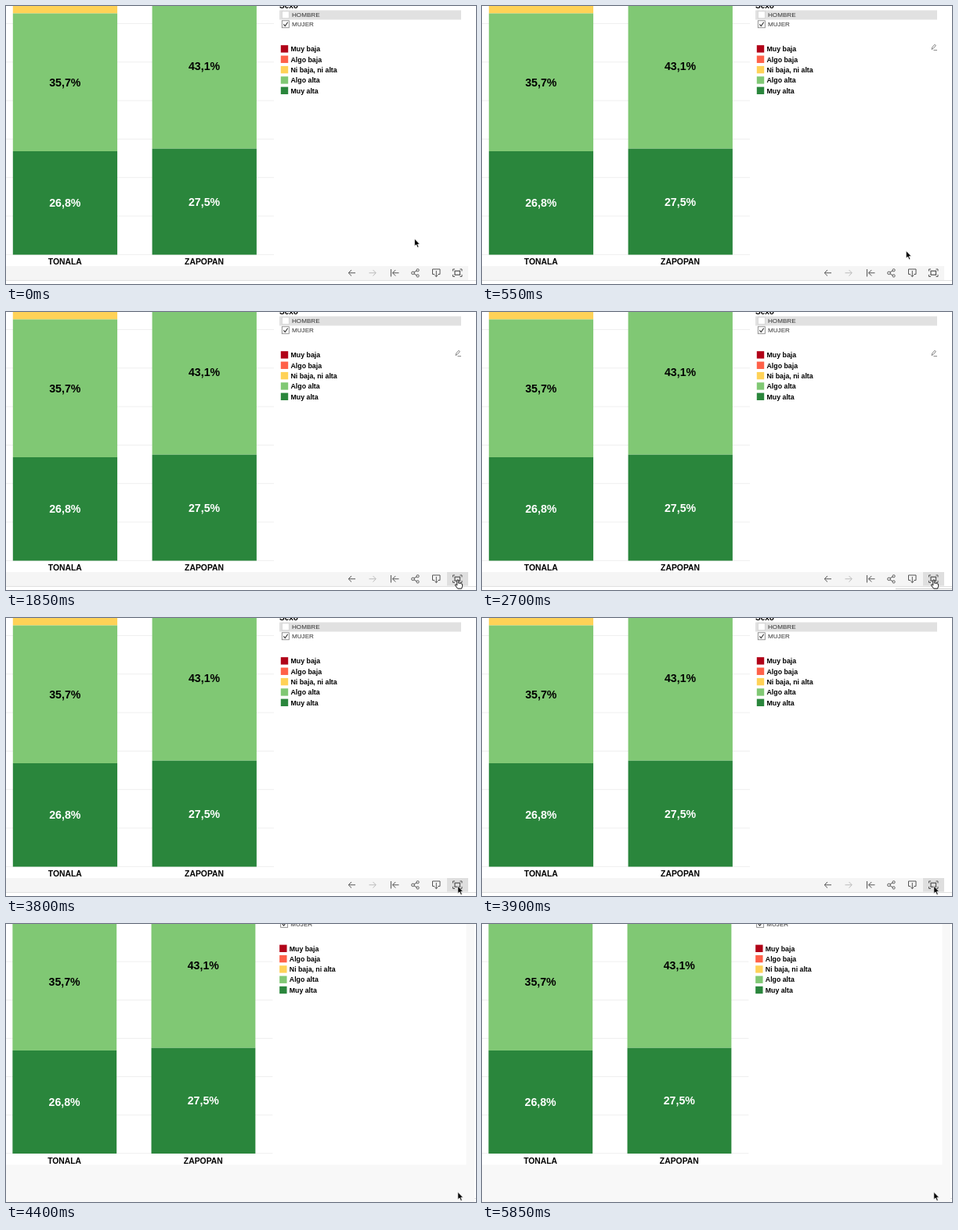
Recreate the animation shown at these times as an HTML page. Size 600 px wide and 356 px high, loop 5900 ms.

```html
<!DOCTYPE html>
<html lang="es">
<head>
<meta charset="utf-8">
<style>
html, body { margin: 0; width: 100%; height: 100%; overflow: hidden; background: #fff; }
svg { display: block; width: 600px; height: 356px; font-family: "Liberation Sans", Arial, sans-serif; }
.b { font-weight: bold; }
.m { text-anchor: middle; }
.icon { fill: none; stroke: #555; stroke-width: 1; }
</style>
</head>
<body>
<svg viewBox="0 0 600 356">
  <rect id="back" width="600" height="356"/>
  <g id="edge">
    <rect width="10" height="356" fill="#fff"/>
    <path d="M0 351.5h10" stroke="#e4e4e4"/>
  </g>
  <g id="page">
    <rect x="-10" y="-10" width="600" height="343" fill="#fff"/>
    <g id="chart"></g>
    <rect x="349" y="5.5" width="232" height="12" fill="#e1e1e1"/>
    <rect x="352.3" y="6.8" width="9" height="9" fill="#fff" stroke="#cfcfcf" stroke-width=".8"/>
    <rect x="352.3" y="18.8" width="9" height="9" fill="#fff" stroke="#777" stroke-width=".8"/>
    <path d="M354.3 23.4l2 2.2 3.4-4.8" fill="none" stroke="#333" stroke-width="1.1"/>
    <g id="pencil" fill="none" stroke="#666" stroke-width=".8">
      <path d="M574 55.5l.8-2.6 3-3.6 1.6 1.3-3 3.6zM576.5 56.6h4.5"/>
    </g>
  </g>
  <g id="toolbar">
    <rect y="333" width="590" height="18" fill="#f5f5f5"/>
    <path d="M0 351.5h600" stroke="#e0e0e0"/>
    <rect id="hover" x="563" y="333" width="27" height="17.5" fill="#dfdfdf"/>
    <g class="icon">
      <path d="M437.5 341.8h8.5M441 338l-3.8 3.8 3.8 3.8"/>
      <path d="M463.5 341.8h8.5M468.500 338l3.800 3.800-3.800 3.800" stroke="#bbb"/>
      <path d="M491.500 337v9.500M493.500 341.800h8M497.300 338l-3.800 3.800 3.800 3.800"/>
      <path d="M521 341l3.200-2M521 342.800l3.200 2"/>
      <circle cx="519.500" cy="341.900" r="1.800"/>
      <circle cx="525.600" cy="338.300" r="1.600"/>
      <circle cx="525.600" cy="345.500" r="1.600"/>
      <path d="M547 343.500h-2.500v-6.500h9.500v6.500h-2.500M549.300 339v7.500M547.200 344.600l2.100 2.100 2.100-2.100"/>
      <path d="M570.500 339.500v-2.500h2.500M579.500 337h2.500v2.500M582 344v2.500h-2.500M573 346.500h-2.500v-2.500"/>
      <rect x="573" y="339.300" width="6.500" height="5" stroke-width="1.200"/>
    </g>
  </g>
  <path id="tip" d="M528 354.500h72" stroke="#cfcfcf"/>
  <g id="cursor" stroke-linejoin="round">
    <path id="arrow" d="M0 0v9.600l2.200-2 1.700 3.700 1.600-.7-1.600-3.500h2.900z" fill="#000" stroke="#fff" stroke-width=".7"/>
    <path id="hand" d="M-1 1q0-1.200 1-1.200t1 1.200v3.200q1-.7 1.700.2 1-.6 1.700.4 1.400-.3 1.400 1.200v2.200l-1 2.800h-5l-3-4q-.5-1.300.6-1.300l1.600 1.200z"
      fill="#fff" stroke="#000" stroke-width=".9"/>
  </g>
</svg>
<script>
const $ = id => document.getElementById(id);
const RED = '#b10318', CORAL = '#ff6149', YELLOW = '#ffd257', LIGHT = '#80c874', DARK = '#2a863c';

const rect = (x, y, w, h, fill) => `<rect x="${x}" y="${y}" width="${w}" height="${h}" fill="${fill}"/>`;
const text = (s, x, mid, size, cls = '', fill = '#000') =>
  `<text x="${x}" y="${mid + size * .358}" font-size="${size}" class="${cls}" fill="${fill}">${s}</text>`;

function bar(x, name, split, top, high, low, highY, lowY) {
  const mid = x + 66.5;
  return rect(x, -30, 133.3, 30 + top, YELLOW) + rect(x, top, 133.3, split - top, LIGHT) +
    rect(x, split, 133.3, 318.5 - split, DARK) +
    text(high, mid, highY, 14.2, 'b m') + text(low, mid, lowY, 14.2, 'b m', '#fff') +
    text(name, mid, 327.7, 10.4, 'b m');
}

let chart = '';
for (let i = 0; i < 7; i++) chart += rect(-10, 22 + i * 49.3, 352, 1, '#efefef');
chart += bar(8.8, 'TONALA', 186, 9.5, '35,7%', '26,8%', 98, 252.3);
chart += bar(186.6, 'ZAPOPAN', 182.7, -30, '43,1%', '27,5%', 76.5, 250.5);
chart += text('Sexo', 349, -1, 10, 'b');
['Muy baja', 'Algo baja', 'Ni baja, ni alta', 'Algo alta', 'Muy alta'].forEach((s, i) => {
  const y = 55 + i * 13.35;
  chart += rect(350.8, y - 4.8, 9.4, 9.4, [RED, CORAL, YELLOW, LIGHT, DARK][i]) + text(s, 363.5, y, 8.8, 'b');
});
$('chart').innerHTML = chart;
$('page').insertAdjacentHTML('beforeend',
  text('HOMBRE', 365, 11.6, 8.1, '', '#333') + text('MUJER', 365, 23.4, 8.1, '', '#333'));

// Cursor path: time, x, y
const path = [[0, 521.5, 298], [300, 521.5, 298], [900, 574, 339], [1050, 574, 339], [1350, 576.8, 343.2], [5900, 576.8, 343.2]];
function cursorAt(t) {
  const i = path.findIndex(p => p[0] > t), [t0, x0, y0] = path[i - 1], [t1, x1, y1] = path[i];
  const u = (t - t0) / (t1 - t0), e = u * u * (3 - 2 * u);
  return [x0 + (x1 - x0) * e, y0 + (y1 - y0) * e];
}

const show = (id, on) => $(id).style.display = on ? '' : 'none';

function draw(now) {
  const t = now % 5900, full = t >= 3950, [x, y] = cursorAt(t);
  const [scale, dx, dy, edge] = !full ? [1, 0, 0, 600] : t < 4300 ? [.989, -.9, -6.1, 592] : [.9965, -.4, -23.4, 598];
  $('page').setAttribute('transform', `translate(${dx} ${dy}) scale(${scale})`);
  $('edge').setAttribute('transform', `translate(${edge} 0)`);
  $('back').setAttribute('fill', full ? '#f8f8f8' : '#fff');
  $('cursor').setAttribute('transform', `translate(${x} ${y})`);
  const over = y > 333, hand = over && t < 3700;
  show('toolbar', !full);
  show('hover', over);
  show('hand', hand);
  show('arrow', !hand);
  show('pencil', t >= 400 && t < 3700);
  show('tip', t >= 2600 && t < 3300);
}

const start = performance.now();
(function tick() {
  draw(performance.now() - start);
  requestAnimationFrame(tick);
})();
</script>
</body>
</html>
```
